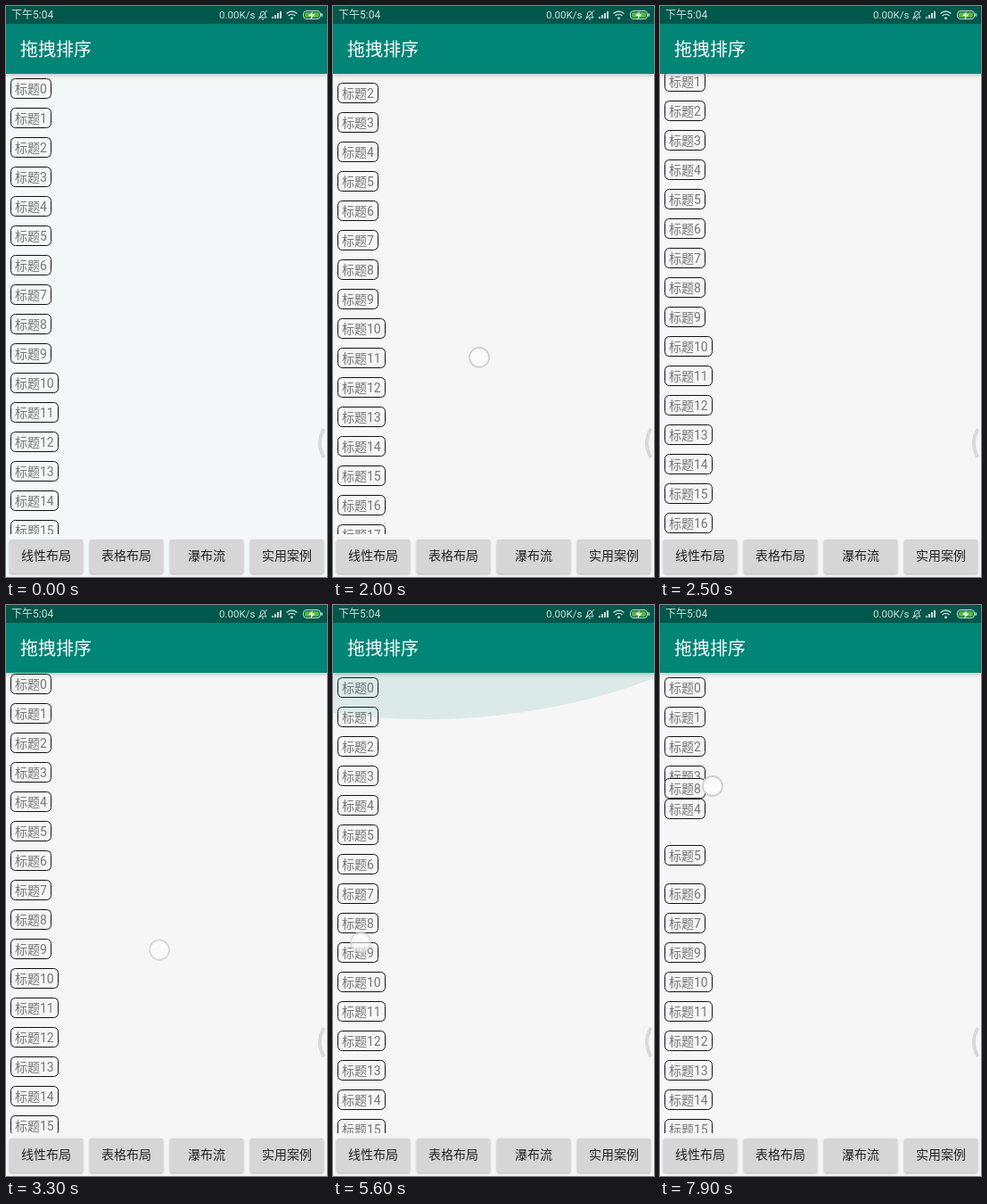
An HTML page with a canvas that plays this animation: 360 by 640 pixels, repeating every 8000 ms.

```html
<!DOCTYPE html>
<html lang="zh-CN">
<head>
<meta charset="utf-8">
<title>拖拽排序</title>
<style>
html, body { margin: 0; width: 100%; height: 100%; overflow: hidden; background: #f6f6f6; }
canvas { display: block; }
</style>
</head>
<body>
<canvas id="stage" width="360" height="640"></canvas>
<script>
const ctx = document.getElementById('stage').getContext('2d');
const LOOP = 8000, STEP = 100, TOP = 76, BOTTOM = 592;
const FONT = 'Roboto, "Noto Sans CJK SC", "Noto Sans CJK", sans-serif';
const INK = '#cfe0dd';
const DRAGGED = 8, DRAG_START = 7450, DRAG_END = 7900, DRAG_RISE = 151;

const ramp = (t, from, to) => Math.min(1, Math.max(0, (t - from) / (to - from)));
const fling = (t, from, to) => 1 - (1 - ramp(t, from, to)) ** 4;
const smooth = k => (1 - Math.cos(Math.PI * k)) / 2;
const slot = n => 93 + 33 * n;

// Up, most of the way down, then back to the top
const scrollAt = t =>
  118 * fling(t, 100, 1300) - 77 * fling(t, 1800, 2500) - 41 * fling(t, 3000, 3700);
const dragAt = t => ramp(t, DRAG_START, DRAG_END);
const swapTime = n =>
  DRAG_START + (DRAG_END - DRAG_START) * (slot(DRAGGED) - slot(n)) / DRAG_RISE;

function text(str, x, y, size, color, align = 'left') {
  ctx.font = `${size}px ${FONT}`;
  ctx.fillStyle = color;
  ctx.textAlign = align;
  ctx.fillText(str, x, y);
}

function box(x, y, w, h, r, fill, stroke) {
  ctx.beginPath();
  ctx.roundRect(x, y, w, h, r);
  if (fill) { ctx.fillStyle = fill; ctx.fill(); }
  if (stroke) { ctx.strokeStyle = stroke; ctx.stroke(); }
}

function line(path, color, width = 1) {
  ctx.strokeStyle = color;
  ctx.lineWidth = width;
  ctx.stroke(new Path2D(path));
  ctx.lineWidth = 1;
}

function raised(blur, alpha, paint) {
  ctx.save();
  ctx.shadowColor = `rgba(0,0,0,${alpha})`;
  ctx.shadowBlur = blur;
  ctx.shadowOffsetY = 1;
  paint();
  ctx.restore();
}

function item(n, center, bg) {
  const label = '标题' + n, y = Math.round(center);
  ctx.font = `14px ${FONT}`;
  const w = Math.round(ctx.measureText(label).width) + 9;
  box(5.5, y - 11.5, w, 22, 5, bg, '#111');
  text(label, 10, y + 5, 14, '#757575');
}

function list(t, bg) {
  const scroll = scrollAt(t);
  for (let n = 0; n < 22; n++) {
    if (n === DRAGGED) continue;
    const moved = n < DRAGGED ? smooth(ramp(t, swapTime(n), swapTime(n) + 250)) : 0;
    item(n, slot(n + moved) - scroll, bg);
  }
  item(DRAGGED, slot(DRAGGED) - DRAG_RISE * dragAt(t) - scroll, bg);
}

function glow(t) {
  const k = ramp(t, 5300, 5600) * (1 - ramp(t, 5600, 6200));
  if (!k) return;
  const ry = 388 * k;
  ctx.fillStyle = `rgba(0,133,119,${.11 * k})`;
  ctx.beginPath();
  ctx.ellipse(105, TOP + 52 * k - ry, 540, ry, 0, 0, 7);
  ctx.fill();
}

function finger(x, y, alpha) {
  ctx.save();
  ctx.globalAlpha = alpha;
  ctx.lineWidth = 1.8;
  box(x - 11, y - 11, 22, 22, 11, '#fbfbfb', '#cfcfd2');
  ctx.restore();
}

function swipe(t, from, to, x, y) {
  if (t < from || t >= to) return;
  finger(x, y, Math.min(1, (t - from + 150) / 250, (to - t) / 250));
}

function touches(t) {
  const follow = from => scrollAt(from) - scrollAt(t);
  swipe(t, 100, 700, 180, 440 + follow(100));
  swipe(t, 1800, 2300, 164, 337 + follow(1800));
  swipe(t, 3000, 3500, 172, 350 + follow(3000));
  swipe(t, 5300, 5750, 31, 310 + 68 * ramp(t, 5300, 5600));
  // long press, then drag
  const k = dragAt(t);
  if (t >= 6700) finger(39 + 20 * k, 360 - 157 * k, .6 + .4 * ramp(t, 7200, 7300));
}

function statusBar() {
  box(0, 0, 360, 20, 0, '#00574b');
  text('下午5:04', 6, 14, 12, INK);
  text('0.00K/s', 239, 14, 11.5, INK);
  // muted bell
  line('M284 13h8l-1.5-2.5V8a2.6 2.6 0 0 0-5 0v2.5zM287 15h2M293 5l-10 10', INK);
  for (let i = 0; i < 4; i++) box(298 + i * 3, 12 - i * 2, 2, 2 + i * 2, 0, INK);
  line('M314.5 8.5q6-5 12 0M316.5 11q4-3.2 8 0', INK, 1.4);
  box(319, 12.5, 3, 2.5, 1.2, INK);
  // battery
  box(333.5, 5.5, 19, 9, 3.5, null, INK);
  box(335, 7, 16, 6, 2, '#4fbd38');
  box(353.5, 8, 1.5, 4, 1, INK);
  ctx.fillStyle = '#fff';
  ctx.fill(new Path2D('M344 6l-5 5h3.5l-1 4 5-5.5h-3.5z'));
}

function buttons() {
  ['线性布局', '表格布局', '瀑布流', '实用案例'].forEach((label, i) => {
    const x = 4 + 90 * i;
    raised(3, .3, () => box(x, 598, 82, 38, 2, '#d6d6d6'));
    text(label, x + 41, 621, 14, '#222', 'center');
  });
}

function draw(t) {
  const bg = t < 100 ? '#f5f8f9' : '#f6f6f6';
  box(0, 0, 360, 640, 0, bg);
  ctx.save();
  ctx.beginPath();
  ctx.rect(0, TOP, 360, BOTTOM - TOP);
  ctx.clip();
  list(t, bg);
  glow(t);
  ctx.restore();

  raised(5, .28, () => box(0, 20, 360, TOP - 20, 0, '#008577'));
  text('拖拽排序', 16, 56, 20, '#fff');
  statusBar();
  buttons();
  line('M356.5 474q-9 16 0 32', '#d9d9d9', 4);
  touches(t);
}

let start;
function loop(now) {
  start ??= now;
  draw(Math.floor((now - start) % LOOP / STEP) * STEP);
  requestAnimationFrame(loop);
}
requestAnimationFrame(loop);
</script>
</body>
</html>
```
